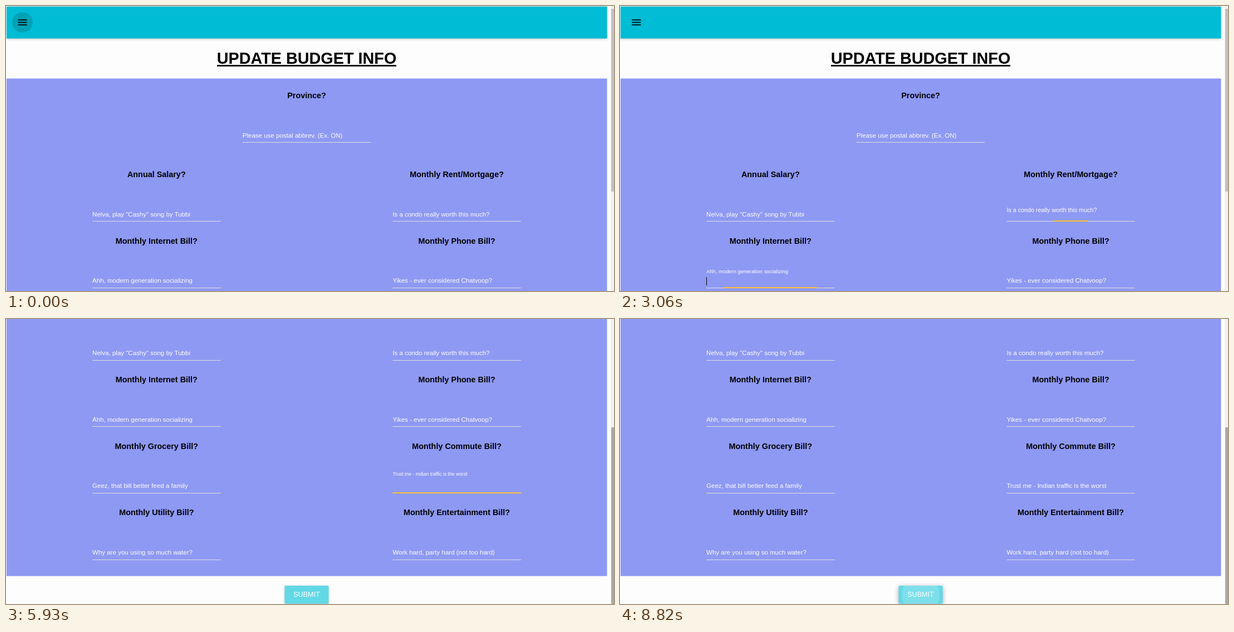
Recreate the animation shown at these times as an HTML page. Size 1092 by 513 pixels, loop 9.15 s.

```html
<!DOCTYPE html>
<html lang="en">
<head>
<meta charset="utf-8">
<title>Update budget info</title>
<style>
  html, body { margin: 0; height: 100%; overflow: hidden; background: #fdfdfd; }
  svg { display: block; width: 1092px; height: 513px; font-family: Arial, "Liberation Sans", sans-serif; }
  .head { font-weight: bold; font-size: 14.4px; text-anchor: middle; }
  .hint { font-size: 11.52px; fill: #fff; }
  .bar { filter: drop-shadow(0 1px 2px rgba(0,0,0,.22)); }
</style>
</head>
<body>
<svg viewBox="0 0 1092 513">
  <defs><clipPath id="btn"><rect x="500.5" y="793.4" width="79" height="32.6" rx="1.8"/></clipPath></defs>
  <g id="page">
    <rect x="1" y="130.5" width="1078.5" height="645.6" fill="#8e99f3"/>
    <rect class="bar" x="1" y="1" width="1078.5" height="57.5" fill="#00bcd4"/>
    <circle id="menu" cx="29.5" cy="29.5" r="21.6"/>
    <path d="M21.4 24.1h16.2v1.8h-16.2zM21.4 28.6h16.2v1.8h-16.2zM21.4 33.1h16.2v1.8h-16.2z" fill="rgba(0,0,0,.87)"/>
    <text x="540" y="104" font-size="28.8" font-weight="bold" text-anchor="middle">UPDATE BUDGET INFO</text>
    <rect x="379" y="106" width="322" height="2.8"/>
    <g id="fields"></g>
    <rect id="submit" x="500.5" y="793.4" width="79" height="32.6" rx="1.8" fill="#62d8e6"/>
    <g clip-path="url(#btn)"><circle id="ripple" cx="540" cy="809.7" r="39.6" fill="#fff"/></g>
    <text x="540" y="813.6" font-size="12.6" fill="#fff" text-anchor="middle">SUBMIT</text>
  </g>
  <rect x="1086" width="6" height="513" fill="#f1f1f1"/>
  <rect id="thumb" x="1087" width="5"/>
</svg>
<script>
const LOOP = 9150, STEP = 50, SCROLL = 313.4, ROW = 119.6;
const $ = id => document.getElementById(id);

// focus moves: start, caret off, lead into the transition
const moves = [
  [600, 1100, 17], [1360, 1900, 17], [2220, 2730, 17], [2960, 3510, 0], [3770, 4340, 17],
  [4630, 5160, 17], [5450, 5930, 17], [6230, 6730, 17], [7090, 7570, 17], [7930, 8410, 17]
];

const texts = [
  ['Province?', 'Please use postal abbrev. (Ex. ON)'],
  ['Annual Salary?', 'Nelva, play "Cashy" song by Tubbi'],
  ['Monthly Rent/Mortgage?', 'Is a condo really worth this much?'],
  ['Monthly Internet Bill?', 'Ahh, modern generation socializing'],
  ['Monthly Phone Bill?', 'Yikes - ever considered Chatvoop?'],
  ['Monthly Grocery Bill?', 'Geez, that bill better feed a family'],
  ['Monthly Commute Bill?', 'Trust me - Indian traffic is the worst'],
  ['Monthly Utility Bill?', 'Why are you using so much water?'],
  ['Monthly Entertainment Bill?', 'Work hard, party hard (not too hard)']
];

function bezier(x1, y1, x2, y2) {
  const at = (a, b, u) => 3 * (1 - u) ** 2 * u * a + 3 * (1 - u) * u * u * b + u ** 3;
  return x => {
    if (x <= 0) return 0;
    if (x >= 1) return 1;
    let lo = 0, hi = 1;
    for (let i = 0; i < 24; i++) {
      const mid = (lo + hi) / 2;
      if (at(x1, x2, mid) < x) lo = mid; else hi = mid;
    }
    return at(y1, y2, lo);
  };
}
const easeOut = bezier(.23, 1, .32, 1);
const easeInOut = bezier(.445, .05, .55, .95);

function add(tag, attrs, text) {
  const el = document.createElementNS('http://www.w3.org/2000/svg', tag);
  set(el, attrs);
  if (text) el.textContent = text;
  return $('fields').appendChild(el);
}
function set(el, attrs) {
  for (const k in attrs) el.setAttribute(k, attrs[k]);
}

const fields = texts.map(([head, hint], i) => {
  const row = Math.floor((i - 1) / 2);
  const mid = i === 0 ? 540 : i % 2 ? 270.3 : 809.6;
  const line = i === 0 ? 245.2 : 387.2 + row * ROW;
  const x = mid - 115.2;
  add('text', { class: 'head', x: mid, y: i === 0 ? 166 : 308 + row * ROW }, head);
  return {
    x, mid, line,
    rule: add('rect', { x, width: 230.4, height: 1, fill: '#e0e0e0' }),
    focus: add('rect', { height: 2, fill: '#ffc233' }),
    caret: add('rect', { x: Math.round(x), y: line - 18.5, width: 1, height: 14.5 }),
    label: add('text', { class: 'hint', y: 13.9 }, hint)
  };
});

// time since a move began, held in steps and frozen once it has settled
function age(t, [start, end, lead]) {
  if (t < start) return -1;
  const held = Math.floor((Math.min(t, end) - start) / STEP) * STEP;
  return held + lead;
}

function draw(t) {
  const ages = moves.map(m => age(t, m));
  const done = ages.map(a => easeOut(a / 450));
  const scroll = t >= moves[5][0] ? SCROLL : 0;
  set($('page'), { transform: `translate(0 ${-scroll})` });
  set($('thumb'), scroll
    ? { y: 195, height: 318, fill: '#a8a8a8' }
    : { y: 5, height: 329, fill: '#c1c1c1' });

  fields.forEach((f, i) => {
    const p = Math.max(0, done[i] - done[i + 1]);
    const y = Math.round(f.line - scroll) + scroll;
    set(f.rule, { y });
    set(f.focus, { x: f.mid - 115.2 * p, y: y - 1, width: 230.4 * p });
    set(f.label, {
      transform: `translate(${f.x} ${f.line - 22.5}) scale(${1 - .25 * p}) translate(0 ${-25.2 * p})`
    });
    set(f.caret, { opacity: t >= moves[i][0] && t < moves[i][1] ? 1 : 0 });
  });

  const away = 1 - done[0];
  set($('menu'), { r: 21.6 * .85 * away, 'fill-opacity': .14 * away });

  const p = done[9];
  const beat = (t >= 8820 ? 890 : Math.max(0, ages[9])) / 750;
  const pulse = 1 - .15 * easeInOut(beat > 1 ? 2 - beat : beat);
  set($('ripple'), { r: 39.6 * p * pulse, 'fill-opacity': .17 * p });
  $('submit').style.filter =
    `drop-shadow(0 ${1 + 1.5 * p}px ${2 + 2 * p}px rgba(0,0,0,${.22 + .13 * p}))`;
}

function tick() {
  draw(performance.now() % LOOP);
  requestAnimationFrame(tick);
}
tick();
</script>
</body>
</html>
```
